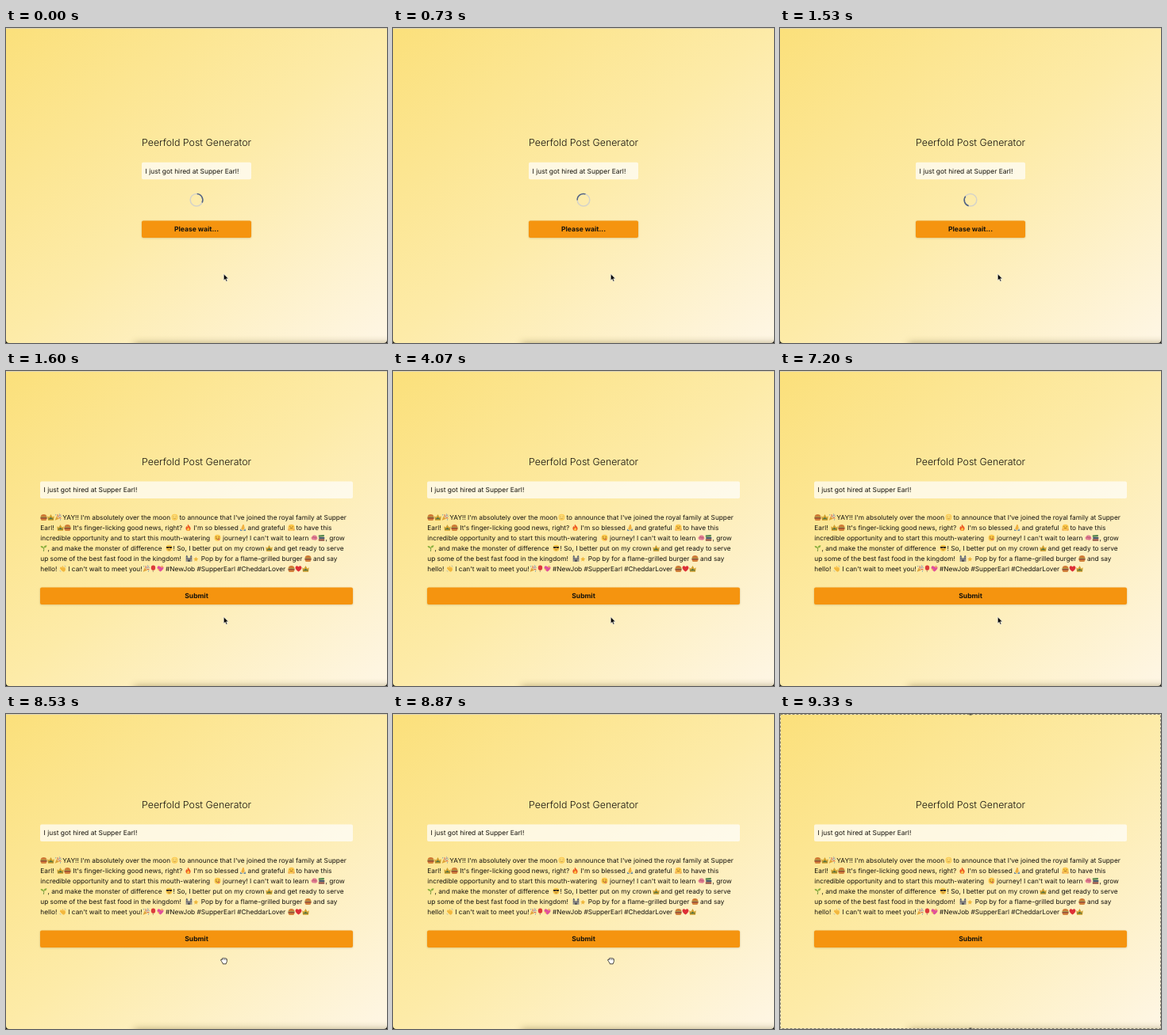
Recreate the animation shown at these times as an HTML page. Size 480 by 398 pixels, loop 9740 ms.

```html
<!DOCTYPE html>
<html lang="en">
<head>
<meta charset="utf-8">
<title>Post Generator</title>
<style>
html, body { margin: 0; width: 100%; height: 100%; overflow: hidden; }
svg { display: block; width: 480px; height: 398px; }
text { font: 8.28px Inter, "Open Sans", sans-serif; fill: #14120c; text-rendering: geometricPrecision; }
.title { font-size: 12.4px; font-weight: 300; }
.field { font-size: 8.45px; }
.label { font-size: 8.55px; font-weight: 700; }
.title, .label { text-anchor: middle; }
</style>
</head>
<body>
<svg viewBox="0 0 480 398">
  <defs>
    <linearGradient id="sky" x2="1" y2="1">
      <stop stop-color="#fbe07b"/>
      <stop offset=".5" stop-color="#fdeba8"/>
      <stop offset="1" stop-color="#fef6e5"/>
    </linearGradient>
    <filter id="soft" x="-10%" y="-100%" width="120%" height="300%"><feGaussianBlur stdDeviation="5"/></filter>
    <filter id="drop" x="-5%" y="-30%" width="110%" height="170%"><feGaussianBlur stdDeviation="1"/></filter>

    <!-- Emoji, each in a 9 by 9 box -->
    <g id="burger">
      <path d="M.6 4C.6-.5 8.4-.5 8.4 4z" fill="#cf7a35"/>
      <path d="M.4 4h8.2v1H.4z" fill="#8a8a35"/>
      <path d="M.5 4.9h8v1.6h-8z" fill="#8a2f1e"/>
      <path d="M.7 6.4h7.6q0 2.2-1.7 2.2H2.4Q.7 8.6.7 6.4z" fill="#d4833c"/>
    </g>
    <g id="crown">
      <path d="M.3 3L2.4 4.4 4.5.8 6.6 4.4 8.7 3 8 8.5H1z" fill="#cf9f2e"/>
      <circle cx="4.5" cy="6" r="1.2" fill="#46724a"/>
      <circle cx="2.3" cy="6.5" r=".9" fill="#6f7a38"/>
      <circle cx="6.7" cy="6.5" r=".9" fill="#6f7a38"/>
    </g>
    <g id="popper">
      <path d="M.6 8.5L2.6 3.4 5.9 6.4z" fill="#dfa43a"/>
      <path d="M3.6 3.6q1.2-1 .4-2.6M5.6 5.6q1.5-1 2.8.2" fill="none" stroke="#c8453f"/>
      <path d="M4.8 4.4L7.8 1.2" stroke="#8565a8"/>
      <path d="M1.2 1.5h1M7.6 3.3h1M6 .7h.9M7 7.6h1" stroke="#4a8dbb"/>
    </g>
    <circle id="face" cx="4.5" cy="4.5" r="4" fill="#fbc648"/>
    <g id="moon">
      <use href="#face"/>
      <circle cx="4.5" cy="4.3" r="3.2" fill="#fddb74"/>
      <path d="M2.4 3.5h1M5.6 3.5h1M2.7 5.6q1.8 1.6 3.6 0" fill="none" stroke="#b98a35" stroke-width=".8"/>
    </g>
    <g id="yum">
      <use href="#face"/>
      <path d="M2.1 3.4h1.3M5.6 3.4h1.3M2.3 5q2.2 2.6 4.4 0" fill="none" stroke="#7a4a17" stroke-width=".8"/>
      <circle cx="6.2" cy="6.7" r="1" fill="#e0665c"/>
    </g>
    <g id="cool">
      <use href="#face"/>
      <path d="M.8 2.7h7.4L7.6 4.6H5.2L4.5 3.5 3.8 4.6H1.4z" fill="#2b2723"/>
      <path d="M2.7 6.2q1.8 1.3 3.6 0" fill="none" stroke="#7a4a17" stroke-width=".7"/>
    </g>
    <g id="hug">
      <use href="#face"/>
      <path d="M2.4 3.2h1M5.6 3.2h1M3 4.9q1.5 1 3 0" fill="none" stroke="#8a561c" stroke-width=".8"/>
      <circle cx="1.6" cy="7" r="1.6" fill="#f2b45a"/>
      <circle cx="7.4" cy="7" r="1.6" fill="#f2b45a"/>
    </g>
    <g id="fire">
      <path d="M4.3.3C5 2.6 7.8 3.2 7.6 6 7.4 8 6 8.8 4.5 8.8S1.4 7.8 1.4 5.8C1.4 4.3 2 3.5 2.6 2.8q.3 1 1 1.2Q3.4 2 4.3.3z" fill="#ee5a24"/>
      <path d="M4.6 4.2q1.7 1.5 1.5 3-.4 1.4-1.6 1.4T2.9 7.2Q3 6 4.6 4.2z" fill="#fcc545"/>
    </g>
    <g id="pray">
      <path d="M4.3.6L5.8 1 6.7 5.4 4.7 8 2.2 6.3z" fill="#f0b040"/>
      <path d="M1 6.2l3.4 2.4H1zM7.3 5.6l1 3H5z" fill="#6f8fa6"/>
    </g>
    <g id="brain">
      <path d="M.8 5.4Q-.2 3.6 1.8 2.6 3 .6 5 1.3q2.5 0 2.9 2.2 1.2 1.7-.2 3-1.3 1.6-3.4.7Q1.4 7.5.8 5.4z" fill="#e07d92"/>
      <path d="M2.3 4.2q1.4-1.3 2.3 0t2.3-.3" fill="none" stroke="#a8465f" stroke-width=".8"/>
    </g>
    <g id="books">
      <path d="M.8 1.3l7-.6v2.2l-7 .5z" fill="#4f8448"/>
      <path d="M1.3 3.6h7v2.2h-7z" fill="#46586e"/>
      <path d="M.8 6.1h7.4v2.2H.8z" fill="#8f4a40"/>
    </g>
    <g id="sprout">
      <path d="M4.3 8.6Q5 6 4.5 4" fill="none" stroke="#71943a"/>
      <path d="M4.5 4.5Q1 5 .6 1.8 4.2 1.4 4.5 4.5zM4.6 4.3Q4.7.9 8.4 1 8.2 4.5 4.6 4.3z" fill="#8bb03f"/>
    </g>
    <g id="castle">
      <path d="M.6 8.5V2.4L1.8.5 3 2.4v1.3h3V2.4L7.2.5l1.2 1.9v6.1z" fill="#8d8b88"/>
      <path d="M.6 2.4L1.8.5 3 2.4zM6 2.4L7.2.5l1.2 1.9z" fill="#4a5870"/>
      <path d="M3.5 8.5V6.2h2v2.3zM1.4 4h.9v1.2h-.9zM6.7 4h.9v1.2h-.9z" fill="#3a3a40"/>
    </g>
    <g id="shine">
      <path d="M4.3 2.4l.9 1.8 2.2.6-1.7 1.3.3 2.2-1.7-1.2-2 1 .5-2.1L1.2 4.6l2.2-.3z" fill="#efb63a"/>
    </g>
    <g id="wave">
      <path d="M1.5 2.7L2.4 2l2 2L3.6 1.4l1-.4L6.2 4l.2-1.7 1 .1.6 3.4Q7.6 8.4 5.2 8.4L3 6.8.9 4.2z" fill="#f3b73d"/>
      <path d="M.6 6.6l1.4 1.7M6.7.6l1.6 1.2" stroke="#8fa6b5" stroke-width=".7"/>
    </g>
    <g id="balloon">
      <ellipse cx="4.5" cy="3.4" rx="2.7" ry="3.1" fill="#dc3b3b"/>
      <path d="M4.5 6.5q-.7 1 0 2.2" fill="none" stroke="#8b5a4c" stroke-width=".6"/>
    </g>
    <path id="shape" d="M4.5 8.3Q.4 5 .5 3.1.7.9 2.6.9 4 1 4.5 2.3 5 1 6.4.9q1.9 0 2.1 2.2Q8.6 5 4.5 8.3z"/>
    <use id="heart" href="#shape" fill="#dd2f36"/>
    <g id="spark">
      <use href="#shape" fill="#e0509a"/>
      <path d="M6.4.6v2.8M5 2h2.8M2 4.6v2M1 5.6h2" stroke="#f6c94c" stroke-width=".8"/>
    </g>
  </defs>

  <rect width="480" height="398" fill="url(#sky)"/>
  <rect x="162" y="398" width="340" height="24" fill="#6e5d2c" opacity=".5" filter="url(#soft)"/>
  <path d="M0 .5h480" stroke="#dcd3b8"/>
  <path d="M0 394q0 4 4 4H0zM480 394q0 4-4 4h4z" fill="#15130e"/>

  <g id="waiting">
    <g fill="none" stroke-width="1.5">
      <circle cx="240" cy="217.3" r="7.8" stroke="#d5d3c9"/>
      <path id="spinner" d="M240.7 209.5A7.8 7.8 0 0 1 247.1 220.6" stroke="#536380"/>
    </g>
  </g>
  <g id="posted"></g>

  <path id="arrow" d="M274.3 310.7v8.3l1.9-1.7 1.3 3 1.4-.6-1.3-2.9h2.6z" stroke="#fff" stroke-width=".6"/>
  <g id="hand" stroke="#1c1a16" stroke-width=".8" stroke-linejoin="round">
    <path d="M271.6 312.6l-1.1-1.6q.2-1.2 1.3-.7l.3.4v-1.6q.8-1.3 1.6-.3.9-1 1.7 0 1-.7 1.6.3 1.2-.3 1.3.9v2.6q-.2 1.6-1.1 2.4v.8h-4v-.8z" fill="#fff"/>
    <path d="M273.8 309.3v1.6M275.4 309.3v1.6M277 309.6v1.4" stroke-width=".5"/>
  </g>
  <g id="frame" fill="none">
    <rect x=".5" y=".5" width="479" height="397" stroke="#f0e8cc"/>
    <rect x=".5" y=".5" width="479" height="397" stroke="#85806f" stroke-dasharray="3 2"/>
    <path d="M238.5 0h3v1.5h-3zM238.5 396.5h3v1.5h-3z" fill="#55524a"/>
  </g>
</svg>
<script>
const LOOP = 9740, STEP = 200 / 3, POSTED = 1600, GRAB = 8470, SELECT = 9330;
const $ = id => document.getElementById(id);

function add(parent, tag, attrs, text = "") {
  const el = document.createElementNS("http://www.w3.org/2000/svg", tag);
  for (const key in attrs) el.setAttribute(key, attrs[key]);
  el.textContent = text;
  parent.append(el);
}

function form(group, x, titleY, inputY, buttonY, label) {
  const width = 480 - 2 * x;
  const box = { x, width, height: 21.5, rx: 2 };
  add(group, "text", { x: 240, y: titleY, class: "title" }, "Peerfold Post Generator");
  add(group, "rect", { ...box, y: inputY, fill: "#fff", opacity: .7 });
  add(group, "text", { x: x + 4.5, y: inputY + 13.7, class: "field" }, "I just got hired at Supper Earl!");
  add(group, "rect", { ...box, y: buttonY + .5, fill: "#7a5a20", opacity: .3, filter: "url(#drop)" });
  add(group, "rect", { ...box, y: buttonY, fill: "#f5940f" });
  add(group, "text", { x: 240, y: buttonY + 13.8, class: "label" }, label);
}

form($("waiting"), 171, 148.8, 169.8, 243.4, "Please wait...");
form($("posted"), 43, 118.6, 139.5, 273.5, "Submit");

// Each row alternates x and content; "@" marks an emoji
const rows = [
  [43, "@burger", 52, "@crown", 61, "@popper", 71.3, "YAY!! I'm absolutely over the moon", 208, "@moon",
    218.5, "to announce that I've joined the royal family at Supper"],
  [43.3, "Earl!", 64, "@crown", 73, "@burger", 84.3, "It's finger-licking good news, right?", 225, "@fire",
    236.3, "I'm so blessed", 294, "@pray", 304.5, "and grateful", 355, "@hug", 365.5, "to have this"],
  [43.3, "incredible opportunity and to start this mouth-watering", 262, "@yum",
    273, "journey! I can't wait to learn", 384, "@brain", 393, "@books", 402.5, ", grow"],
  [43, "@sprout", 52.5, ", and make the monster of difference", 201, "@cool",
    210.5, "! So, I better put on my crown", 327, "@crown", 337.5, "and get ready to serve"],
  [43.3, "up some of the best fast food in the kingdom!", 226, "@castle", 235, "@shine",
    245.8, "Pop by for a flame-grilled burger", 376, "@burger", 387, "and say"],
  [43.3, "hello!", 67, "@wave", 78.3, "I can't wait to meet you!", 172, "@popper", 181, "@balloon", 190, "@spark",
    201, "#NewJob #SupperEarl #CheddarLover", 355, "@burger", 364, "@heart", 373, "@crown"]
];
rows.forEach((row, i) => {
  const y = 188 + 13 * i;
  for (let k = 0; k < row.length; k += 2) {
    const x = row[k], item = row[k + 1];
    if (item[0] === "@") add($("posted"), "use", { href: "#" + item.slice(1), x, y: y - 7.7 });
    else add($("posted"), "text", { x, y }, item);
  }
});

const show = (id, on) => $(id).setAttribute("visibility", on ? "visible" : "hidden");

function draw(now) {
  const t = now % LOOP;
  const spin = Math.floor((t + 4) / STEP) * STEP * .36;
  $("spinner").setAttribute("transform", `rotate(${spin} 240 217.3)`);
  show("waiting", t < POSTED);
  show("posted", t >= POSTED);
  show("arrow", t < GRAB);
  show("hand", t >= GRAB && t < SELECT);
  show("frame", t >= SELECT);
  requestAnimationFrame(draw);
}
draw(performance.now());
</script>
</body>
</html>
```
